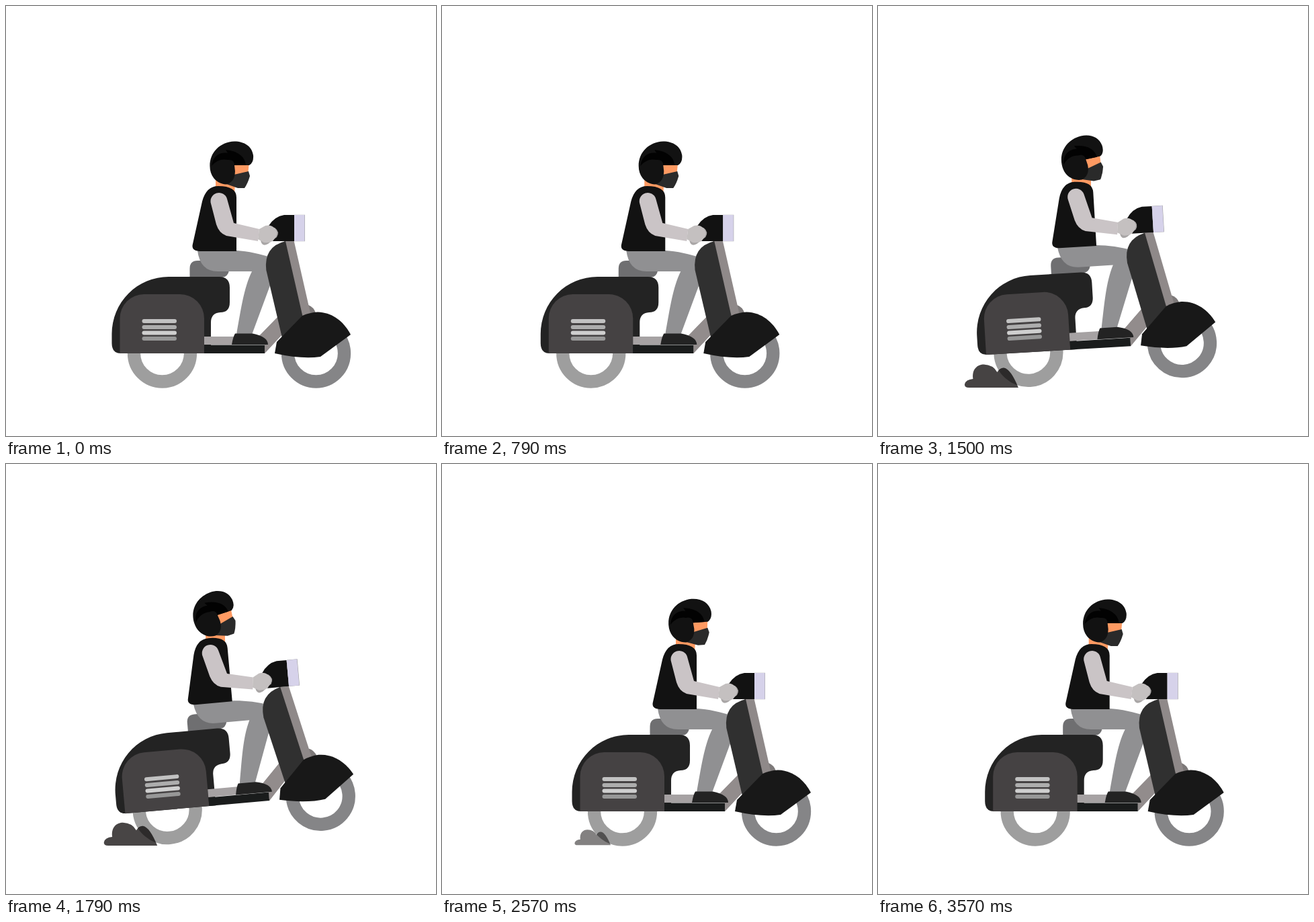
Write an HTML page that moves like this. It is 640x640 px and loops after 3.64 s.

```html
<!DOCTYPE html>
<html lang="en">
<head>
<meta charset="utf-8">
<title>Scooter rider</title>
<style>
  html, body { margin: 0; width: 100%; height: 100%; overflow: hidden; background: #fff; }
  svg { display: block; width: 100%; height: 100%; }
  #smoke { mix-blend-mode: multiply; }
</style>
</head>
<body>
<svg viewBox="0 0 640 640">
  <rect width="640" height="640" fill="#fff"/>
  <g id="bike">
    <g fill="none" stroke-width="19.3">
      <circle cx="232.5" cy="517" r="42" stroke="#9e9e9e"/>
      <circle cx="461.5" cy="517" r="42" stroke="#858587"/>
    </g>
    <!-- seat and rear body -->
    <path fill="#6f6f71" d="M273.5 404V391Q273.5 379 285 379H332V394Q330 403 322 404Z"/>
    <path fill="#232323" d="M171 517Q157.5 517 157.5 502V488A84.5 85 0 0 1 242 403H317Q333 403 333 419V441Q333 456 319 456Q305 457 305 471V517Z"/>
    <path fill="#454243" d="M169.5 517V465A36 36 0 0 1 205.5 429H259A36 36 0 0 1 295 465V517Z"/>
    <g stroke-width="6" stroke-linecap="round">
      <path stroke="#c2c2c2" d="M205.5 469H251"/>
      <path stroke="#adadad" d="M205.5 478H251"/>
      <path stroke="#cfcfcf" d="M205.5 486.5H251"/>
      <path stroke="#979797" d="M205.5 495H251"/>
    </g>
    <!-- footboard -->
    <path fill="#a6a2a3" d="M295 492H376L412 455V488L385 517V504H295Z"/>
    <path fill="#928c8c" d="M385 517V504L376 492L412 455V488Z"/>
    <path fill="#1a1c1c" d="M295 504.5H385V517H295Z"/>
    <!-- leg and shoe -->
    <path fill="#909092" d="M285 364H343C360 365 380 369 396 375V408L366 489H343C350 450 354 420 366 395H315Q289 395 285 364Z"/>
    <path fill="#232323" d="M341 487.5H367Q390 492 390 504H336Q338 492 341 487.5Z"/>
    <!-- steering column and fender -->
    <path fill="#7d7979" d="M450 445Q458 448 461 457H450Z"/>
    <path fill="#8f8989" d="M414 350H428.7L453.3 458L438 464Z"/>
    <path fill="#303030" d="M416 350L442 464L412 498L387.3 393Q383.5 358 416 350Z"/>
    <path fill="#181818" d="M400 517L403 500L441 461Q452 456 464 455.5C486 456 503 470 513 489L468 522Q440 526 400 517Z"/>
    <!-- headlight -->
    <path fill="#121212" d="M429 311H414Q400 313 391 327L397 350H429Z"/>
    <path fill="#999" d="M429 310.8H445V350.2H429Z"/>
    <path fill="#d6d2ea" d="M429 311H444.5V350H429Z"/>
    <!-- rider -->
    <path fill="#ff9a62" d="M312 250H342L340 279H312Z"/>
    <path fill="#121212" d="M343 365H288Q275 364 278 354L292 291Q298 268 316 268Q343 268 343 285Z"/>
    <path fill="#a9a6a6" d="M394 330H400Q408 336 403 344L390 354Q381 359 379 349Z"/>
    <path fill="#cac4c6" d="M305 294A12.5 12.5 0 0 1 329 287L339 323L377 332L375 350L328 342Q317 338 313 325Z"/>
    <path fill="#c4c0c0" d="M377 332L386 327Q395 325 401 332Q405 337 402 343L397 350Q391 353 384 352L375 347Z"/>
    <g id="head">
      <path fill="#ff9a62" d="M336 232H362L360 252H336Z"/>
      <path fill="#2a2a2a" d="M335 252L361 246L363 253Q360 264 355 271H345L328 265Z"/>
      <path fill="#121212" d="M340 237H362Q369 233 368 222C366 209 355 201.5 340 201.5C318 202.5 303.4 218 303.4 238C303.4 254 314 265 328 265.5Q341 262 341 246Z"/>
      <path fill="#020202" d="M306 238C308 222 320 217 330 219L327 214C345 216 356 224 357 237H340Q340 228 330 229Q316 226 306 238Z"/>
    </g>
  </g>
  <path id="smoke" fill="#464343" d="M137.5 563Q139 556 150 555C148 540 157 533.5 166 533.5Q180 534 186 545Q190 538 196 538.5Q206 540 217.5 568H144Q137 568 137.5 563Z"/>
</svg>
<script>
const LOOP = 3640;

const smooth = u => (1 - Math.cos(Math.PI * u)) / 2;
const slowDown = u => Math.sin(Math.PI / 2 * u);
const speedUp = power => u => u ** power;

// Eased progress from 0 to 1 between two times, constant outside them.
const ramp = (t, from, to, ease = smooth) => ease(Math.min(1, Math.max(0, (t - from) / (to - from))));

const [bike, head, smoke] = ["bike", "head", "smoke"].map(id => document.getElementById(id));

function draw(t) {
  // Roll back, accelerate forward, drift home.
  const dx = 51 * ramp(t, 1280, 2440) - 13 * ramp(t, 0, 1280, slowDown) - 38 * ramp(t, 2440, 3610, speedUp(1.35));
  const lift = ramp(t, 1250, 1660);
  const tilt = -5.1 * (lift - ramp(t, 1700, 2300, speedUp(3)));
  const nod = 1.7 * tilt - 4 * (lift - ramp(t, 3000, 3480));
  const puff = ramp(t, 1150, 1400) - ramp(t, 1500, 3050, speedUp(3));

  bike.setAttribute("transform", `translate(${dx}) rotate(${tilt} 205 517)`);
  head.setAttribute("transform", `rotate(${nod} 327 270)`);
  smoke.setAttribute("transform", `translate(${dx + 210} 566) scale(${puff}) translate(-210 -566)`);
  smoke.setAttribute("opacity", puff);
}

const start = performance.now();
function tick() {
  draw((performance.now() - start) % LOOP);
  requestAnimationFrame(tick);
}
tick();
</script>
</body>
</html>
```
